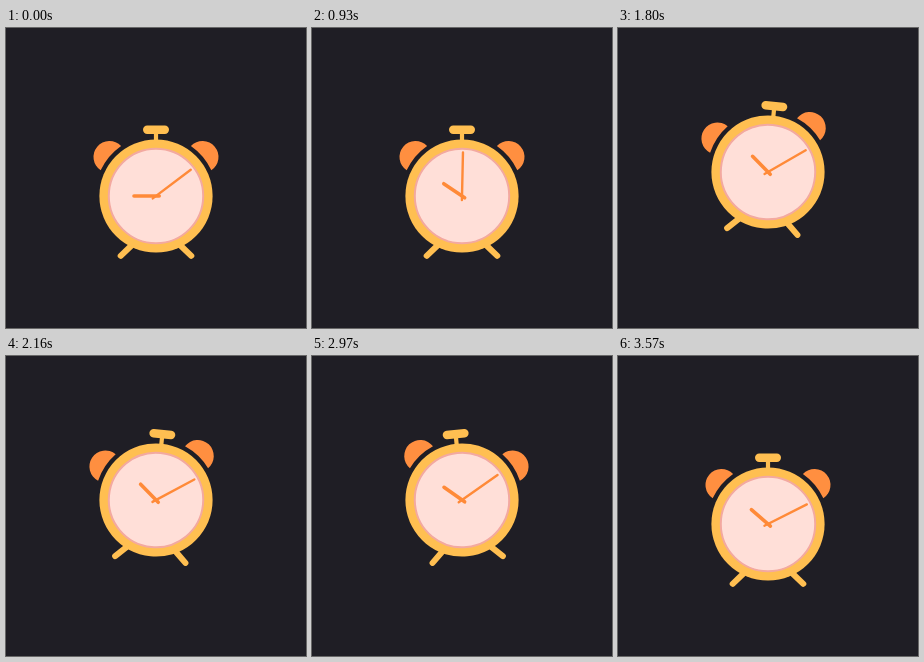
Write an HTML page that moves like this. It is 300 by 300 pixels and loops after 3630 ms.

```html
<!DOCTYPE html>
<html lang="en">
<head>
<meta charset="utf-8">
<title>Alarm clock</title>
<style>
  html, body { margin: 0; width: 100%; height: 100%; overflow: hidden; background: #1f1e25; }
  svg { display: block; width: 100%; height: 100%; }
</style>
</head>
<body>
<svg viewBox="0 0 300 300">
  <defs>
    <path id="bell" d="M-15.9 -58.9A16 16 0 1 1 15.9 -58.9A61 61 0 0 0 -15.9 -58.9Z"/>
  </defs>
  <g id="clock">
    <g id="bells" fill="#ff8f40">
      <use href="#bell" transform="rotate(-50)"/>
      <use href="#bell" transform="rotate(50)"/>
    </g>
    <g id="body" stroke-linecap="round" fill="none">
      <path d="M-24 49L-35.3 59.8M24 49L35.3 59.8" stroke="#ffbf51" stroke-width="6"/>
      <path d="M0 -66V-54" stroke="#ffbf51" stroke-width="4.2"/>
      <path d="M-8.8 -66.2H8.8" stroke="#ffbf51" stroke-width="8.4"/>
      <circle r="56.6" fill="#ffbf51"/>
      <circle r="47.2" fill="#ffdfd8" stroke="#f3a9a0" stroke-width="2"/>
      <path id="hour" d="M0 3.2V-22" stroke="#ff8a38" stroke-width="3.6"/>
      <path id="minute" d="M0 4V-43.5" stroke="#ff8a38" stroke-width="2.4"/>
    </g>
  </g>
</svg>
<script>
const STEP = 30, LOOP = 3630, LAST = 119;
const $ = id => document.getElementById(id);
const clamp = x => Math.min(1, Math.max(0, x));
const ease = x => x * x * (3 - 2 * x);
const ramp = (k, a, b) => clamp((k - a) / (b - a));
const smooth = (k, a, b) => ease(ramp(k, a, b));
const wave = deg => Math.sin(deg * Math.PI / 180);

// lean back, ring six steps per swing, settle
function bodyTilt(k) {
  if (k <= 46) return -11 * smooth(k, 36, 46);
  if (k >= 103) return 11 * (1 - smooth(k, 103, 111));
  return 11 * wave(60 * k + 30);
}

// bells trail the body by one step
function bellTilt(k) {
  if (k <= 47) return -20 * smooth(k, 39, 47);
  if (k >= 104) return 20 * (1 - smooth(k, 104, 111));
  return 13 * wave(60 * k - 30);
}

function turn(id, deg) {
  $(id).setAttribute("transform", `rotate(${deg.toFixed(3)})`);
}

function draw(ms) {
  const k = Math.min(LAST, Math.floor((ms % LOOP) / STEP));
  const lift = 24 * (smooth(k, 36, 48) - smooth(k, 102, 114));
  const spin = ramp(k, 0, 36), drift = ramp(k, 36, LAST);
  $("clock").setAttribute("transform", `translate(150 ${(168 - lift).toFixed(3)})`);
  turn("body", bodyTilt(k));
  turn("bells", bellTilt(k));
  turn("hour", 270 + 39.5 * spin + 1.5 * drift);
  turn("minute", 53 + 358 * spin + 12.2 * drift);
}

const start = performance.now();
function tick() {
  draw(performance.now() - start);
  requestAnimationFrame(tick);
}
tick();
</script>
</body>
</html>
```
